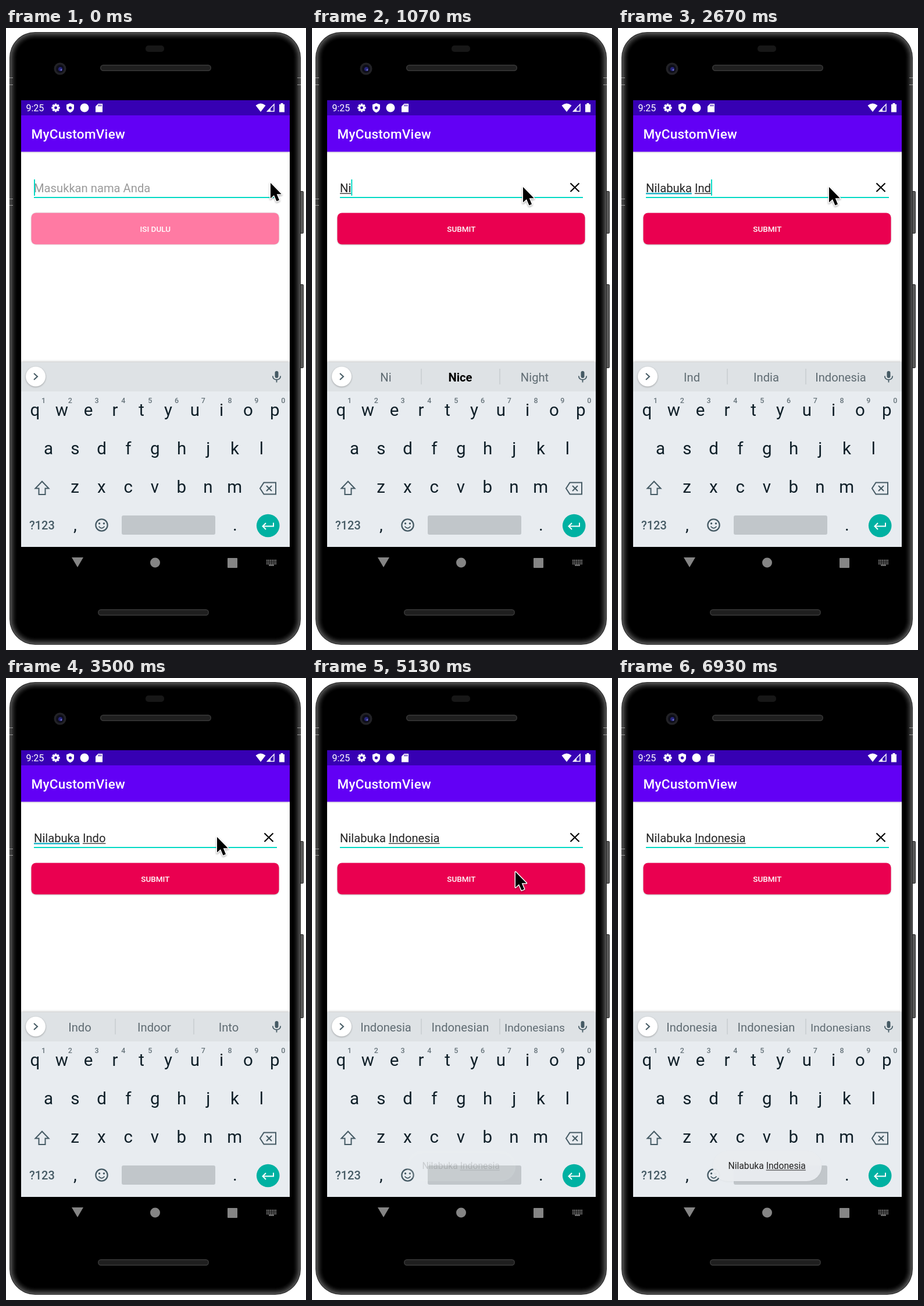
Animation, 516 px wide and 1068 px high, one loop 7010 ms. Source, as an HTML page with a canvas:

```html
<!DOCTYPE html>
<html lang="id">
<head>
<meta charset="utf-8">
<title>MyCustomView</title>
<style>
html, body { margin: 0; width: 100%; height: 100%; overflow: hidden; background: #fff; }
canvas { display: block; width: 516px; height: 1068px; }
</style>
</head>
<body>
<canvas id="stage"></canvas>
<script>
const LOOP = 7010;
const canvas = document.getElementById('stage');
const ctx = canvas.getContext('2d');
const ratio = window.devicePixelRatio || 1;
canvas.width = 516 * ratio;
canvas.height = 1068 * ratio;

const PHRASE = 'Nilabuka Indonesia';
const FIRST_WORD = 'Nilabuka';
const FIELD_SIZE = 20.2;
const TEAL = '#03dac5';
const ICON = '#455a64';

// One entry per typed letter: time in ms, then the suggestion strip.
const KEYSTROKES = [
  [800, 'N', 'No', 'Not'], [970, 'Ni', '*Nice', 'Night'],
  [1180, 'Nil', 'Nile', 'Nail'], [1320, 'Nila', 'Nile', 'Nil'],
  [1460, 'Nilab'], [1590, 'Nilabu'], [1720, FIRST_WORD], [1860, FIRST_WORD],
  [2060, 'is', 'and', 'in'], [2330, 'I', 'In', 'It'],
  [2480, 'In', 'Into', 'India'], [2640, 'Ind', 'India', 'Indonesia'],
  [2850, 'Indo', 'Indoor', 'Into'], [3720, 'Indon', 'Indonesia', 'Indonesian'],
  ...[3860, 3990, 4120, 4250].map(t => [t, 'Indonesia', 'Indonesian', 'Indonesians'])
];

// Pointer tip: time, x, y
const POINTER = [
  [0, 455, 266], [650, 363, 273], [4380, 363, 273], [4470, 350, 297],
  [4700, 350, 333], [5950, 350, 333], [6500, 522, 352], [LOOP, 522, 352]
];

const clamp = v => Math.max(0, Math.min(1, v));

function box(x, y, w, h, r, fill) {
  ctx.beginPath();
  ctx.roundRect(x, y, w, h, r);
  ctx.fillStyle = fill;
  ctx.fill();
}

function disc(x, y, r, fill) {
  ctx.beginPath();
  ctx.arc(x, y, r, 0, Math.PI * 2);
  ctx.fillStyle = fill;
  ctx.fill();
}

function fillPath(d, color) {
  ctx.fillStyle = color;
  ctx.fill(new Path2D(d));
}

function strokePath(d, color, width = 2) {
  ctx.strokeStyle = color;
  ctx.lineWidth = width;
  ctx.stroke(new Path2D(d));
}

function setFont(size, weight = 400) {
  ctx.font = `${weight} ${size}px Roboto, sans-serif`;
}

function label(text, x, y, size, color, align = 'left', weight = 400) {
  setFont(size, weight);
  ctx.textAlign = align;
  ctx.fillStyle = color;
  ctx.fillText(text, x, y);
}

function widthOf(text, size) {
  setFont(size);
  return ctx.measureText(text).width;
}

function withShadow(color, blur, offset, draw) {
  ctx.save();
  ctx.shadowColor = color;
  ctx.shadowBlur = blur * ratio;
  ctx.shadowOffsetY = offset * ratio;
  draw();
  ctx.restore();
}

function speaker(x, y) {
  box(x, y, 191, 11, 5.5, '#383838');
  box(x + 1.5, y + 1.5, 188, 8, 4, '#1f1f1f');
}

function drawPhone() {
  for (const [y, h] of [[280, 73], [440, 144]]) {
    box(504, y, 8, h, 2, '#222');
    box(507, y + 1, 4, h - 2, 1, '#5c5c5c');
  }
  // Bevelled rim: a thin dark edge, then a highlight fading to black
  for (let inset = 0; inset <= 13; inset++) {
    const grey = inset ? Math.round(92 * (1 - inset / 13) ** 1.6) : 34;
    box(6 + inset, 7 + inset, 501 - 2 * inset, 1052 - 2 * inset, 44 - inset,
      `rgb(${grey},${grey},${grey})`);
  }
  for (const y of [85, 97, 293, 304]) {
    box(6, y, 6, 1, 0, '#999');
    if (y < 100) box(501, y, 6, 1, 0, '#999');
  }
  box(240, 30, 32, 11, 5, '#171717');
  speaker(162, 63);
  speaker(158, 998);
  disc(93, 70, 10.5, '#222226');
  disc(93, 70, 7, '#0e0e1a');
  disc(93.5, 70.5, 3.5, '#26267a');
  disc(95, 72, 1.4, '#7070c8');

  fillPath('M113 909H133L123 926Z', '#858585');
  disc(256.5, 918, 8.5, '#858585');
  box(381, 910, 17, 17, 1, '#858585');
  for (let row = 0; row < 3; row++)
    for (let col = 0; col < 6; col++)
      box(448 + col * 3, 913 + row * 3, 2, 2, 0, '#858585');
  box(452, 921.5, 9, 2, 0, '#858585');
}

function drawBars() {
  box(26, 124, 462, 767, 0, '#fff');
  withShadow('rgba(0,0,0,.15)', 2, 1, () => box(26, 150, 462, 62.5, 0, '#6200f5'));
  box(26, 124, 462, 26, 0, '#3700b3');
  label('9:25', 34.5, 143, 16, '#fff');
  ctx.letterSpacing = '0.28px';
  label('MyCustomView', 43.5, 190, 22.5, '#fff', 'left', 500);
  ctx.letterSpacing = '0px';

  // Settings cog
  ctx.save();
  ctx.translate(85.5, 137);
  for (let i = 0; i < 8; i++) {
    ctx.rotate(Math.PI / 4);
    box(-1.7, -7.2, 3.4, 4, .5, '#fff');
  }
  ctx.restore();
  disc(85.5, 137, 5.4, '#fff');
  disc(85.5, 137, 2.4, '#3700b3');
  fillPath('M110.5 129L117 131.5V137C117 141 114 144 110.5 145.3C107 144 104 141 104 137V131.5Z', '#fff');
  disc(110.5, 137, 2.6, '#3700b3');
  disc(135, 137, 7.5, '#fff');
  fillPath('M158.5 130H166V144.5H154V134.5Z', '#fff');
  for (let i = 0; i < 3; i++) box(158.5 + i * 2.3, 131.5, 1.2, 3, 0, '#3700b3');

  fillPath('M438 144L429.5 133Q438 126 446.5 133Z', '#fff');
  strokePath('M449.5 143H461V131Z', '#fff', 1.5);
  fillPath('M455 137.5V143.5H449Z', '#fff');
  fillPath('M470 131H472.5V129H476.5V131H479V144.5H470Z', '#fff');
}

function drawSuggestions(words) {
  const slot = 104;
  const centers = words.length === 1 ? [255] : [127, 255, 383];
  words.forEach((entry, i) => {
    const bold = entry[0] === '*';
    const word = bold ? entry.slice(1) : entry;
    const size = FIELD_SIZE * Math.min(1, slot / widthOf(word, FIELD_SIZE));
    label(word, centers[i], 606.5, size, bold ? '#000' : '#5f6b72', 'center', bold ? 700 : 400);
  });
  if (words.length === 3) for (const x of [187.5, 322.5]) box(x, 585, 1, 27, 0, '#bcc2c6');
}

function drawSmiley() {
  ctx.save();
  ctx.translate(164.5, 853.5);
  ctx.scale(1.125, 1.125);
  strokePath('M9 0A9 9 0 1 1 -9 0A9 9 0 1 1 9 0', ICON, 2);
  for (const x of [-3.5, 3.5]) disc(x, -2.5, 1.5, ICON);
  strokePath('M-4.4 2Q0 7.5 4.4 2', ICON, 1.6);
  ctx.restore();
}

function drawKeyboard(suggestions) {
  withShadow('rgba(0,0,0,.25)', 4, -1, () => box(26, 574, 462, 317, 0, '#e8ecf0'));
  box(26, 574, 462, 50, 0, '#dee2e5');
  withShadow('rgba(0,0,0,.3)', 3, 1, () => disc(51, 598.5, 17, '#fff'));
  strokePath('M48 593L54 598.5L48 604', ICON);
  box(462.5, 589, 6, 12, 3, ICON);
  strokePath('M458.8 597.5C458.8 606 472.2 606 472.2 597.5M465.5 604V608.5', ICON, 1.8);
  drawSuggestions(suggestions);

  const rows = [['qwertyuiop', 50], ['asdfghjkl', 73], ['zxcvbnm', 118.5]];
  rows.forEach(([letters, left], row) =>
    [...letters].forEach((key, i) =>
      label(key, left + i * 45.8, 666 + row * 66, 29.5, '#0f1f28', 'center')));
  [...'1234567890'].forEach((digit, i) =>
    label(digit, 64.5 + i * 45.8, 644, 12.5, '#66737a', 'center', 500));

  strokePath('M62 778.5L73.5 790.5H67.5V801H56.5V790.5H50.5Z', ICON, 2);
  strokePath('M443.5 780.5H464V800.5H443.5L437 790.5ZM448 786L457 795M457 786L448 795', ICON, 2);
  label('?123', 40, 861, 20, ICON, 'left', 500);
  label(',', 119, 863, 29.5, '#0f1f28', 'center');
  label('.', 394, 863, 29.5, '#0f1f28', 'center');
  drawSmiley();
  box(199, 837, 161, 33, 3, '#c1c6ca');
  disc(450.7, 854.5, 19.8, '#00b1a2');
  strokePath('M460 849.5V855.5H442M447 850L441.5 855.5L447 861', '#fff', 2);
}

function drawField(t, typed, lastKey) {
  const baseline = 281.5;
  box(48, 290, 418, 2, 0, TEAL);
  if (typed) {
    label(typed, 48, baseline, FIELD_SIZE, '#222');
    strokePath('M444.5 266.5L459.5 281M459.5 266.5L444.5 281', '#000', 2.2);
    const start = typed.length > FIRST_WORD.length ? FIRST_WORD.length + 1 : 0;
    const from = widthOf(typed.slice(0, start), FIELD_SIZE);
    box(48 + from, 283.5, widthOf(typed, FIELD_SIZE) - from, 1.3, 0, '#222');
    if (start && t < 5110) box(48, 283, widthOf(FIRST_WORD, FIELD_SIZE), 2.4, 0, '#23b3c8');
  } else {
    label('Masukkan nama Anda', 48, baseline, FIELD_SIZE, '#9a9a9a');
  }
  if ((t - lastKey) % 1000 < 500)
    box(48 + widthOf(typed, FIELD_SIZE), 260, 2, 28, 0, TEAL);
}

function drawButton(enabled) {
  withShadow('rgba(0,0,0,.25)', 2, enabled ? 1 : 0, () =>
    box(43.5, 317.5, 426, 54, 8, enabled ? '#ea0050' : '#ff7aa3'));
  label(enabled ? 'SUBMIT' : 'ISI DULU', 256.8, 349.5, 13.5, '#fff', 'center', 500);
}

function drawToast(t) {
  const alpha = clamp((t - 5100) / 200);
  if (!alpha) return;
  const size = 15.7;
  const left = 189.5;
  ctx.save();
  ctx.globalAlpha = alpha;
  withShadow('rgba(0,0,0,.04)', 3, 1, () => box(163, 812, 187.5, 52, 26, 'rgba(234,237,240,.96)'));
  label(PHRASE, left, 843, size, '#222');
  const from = widthOf(FIRST_WORD + ' ', size);
  box(left + from, 844.5, widthOf(PHRASE, size) - from, 1, 0, '#222');
  ctx.restore();
}

function drawPointer(t) {
  const next = POINTER.findIndex(p => p[0] > t);
  const [t0, x0, y0] = POINTER[next - 1];
  const [t1, x1, y1] = POINTER[next];
  const k = (t - t0) / (t1 - t0);
  const eased = k * k * (3 - 2 * k);
  ctx.save();
  ctx.translate(x0 + (x1 - x0) * eased, y0 + (y1 - y0) * eased);
  const arrow = 'M0 0V26.5L6 21L10.5 31.5L15 29.5L10.7 19.3H18.8Z';
  ctx.lineJoin = 'round';
  withShadow('rgba(0,0,0,.35)', 3, 1.5, () => strokePath(arrow, '#fff', 3));
  fillPath(arrow, '#000');
  ctx.restore();
}

function render(now) {
  const t = now % LOOP;
  const count = KEYSTROKES.filter(k => k[0] <= t).length;
  const [lastKey, ...suggestions] = count ? KEYSTROKES[count - 1] : [0];
  ctx.setTransform(ratio, 0, 0, ratio, 0, 0);
  ctx.fillStyle = '#fff';
  ctx.fillRect(0, 0, 516, 1068);
  drawPhone();
  drawBars();
  drawField(t, PHRASE.slice(0, count), lastKey);
  drawButton(count > 0);
  drawKeyboard(suggestions);
  drawToast(t);
  drawPointer(t);
}

const startTime = performance.now();
function tick() {
  render(performance.now() - startTime);
  requestAnimationFrame(tick);
}
tick();
</script>
</body>
</html>
```
